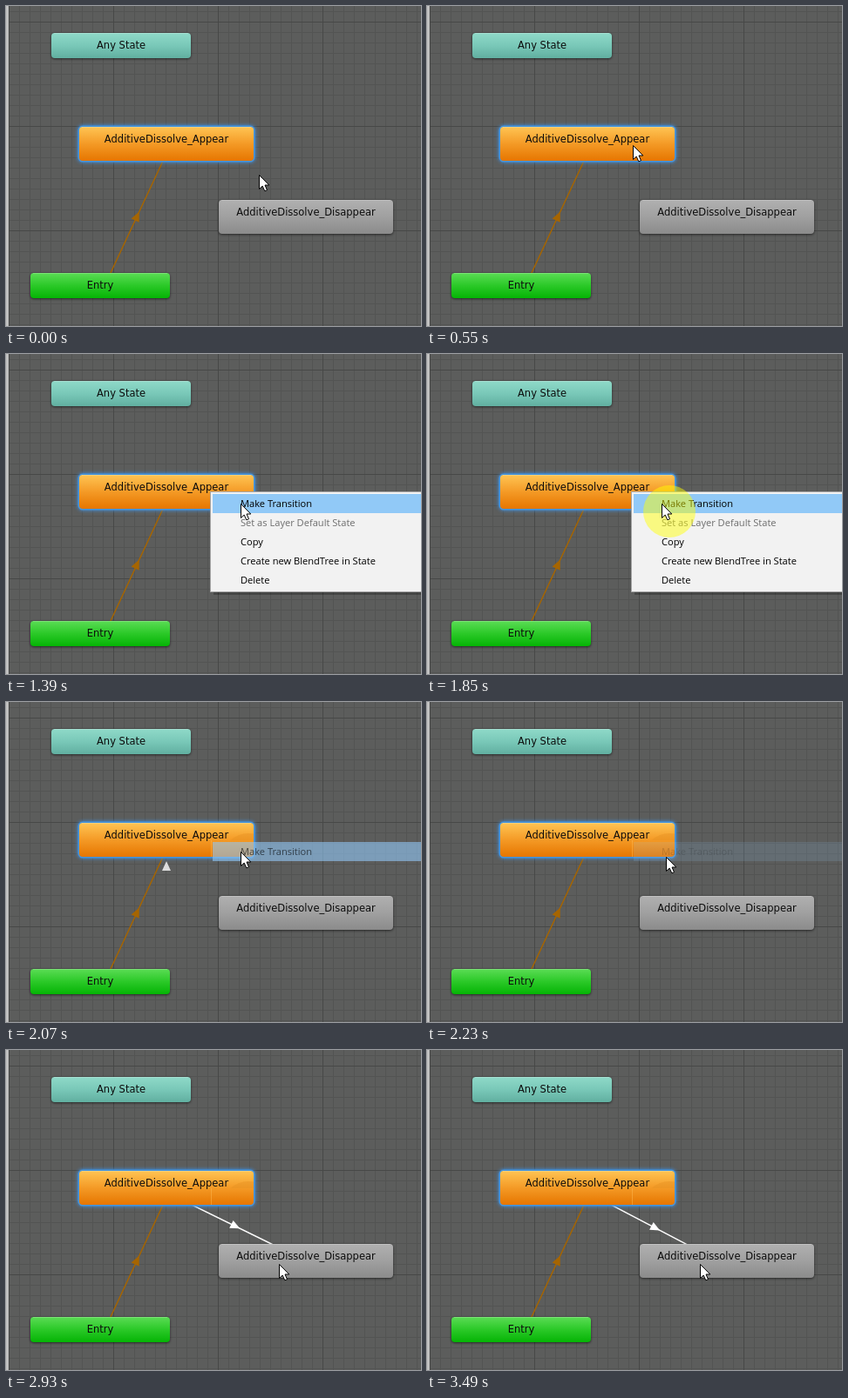
An HTML page with a canvas that plays this animation: 476x368 px, repeating every 4650 ms.

```html
<!DOCTYPE html>
<html lang="en">
<head>
<meta charset="utf-8">
<title>State graph</title>
<style>
html, body { margin: 0; width: 100%; height: 100%; overflow: hidden; background: #5c5d5c; }
canvas { display: block; }
</style>
</head>
<body>
<canvas id="stage" width="476" height="368"></canvas>
<script>
const W = 476, H = 368, LOOP = 4650;
const ctx = document.getElementById('stage').getContext('2d');
const NODE_FONT = '11.5px "DejaVu Sans", sans-serif';
const MENU_FONT = '11.1px "Open Sans", sans-serif';

const nodes = {
  any: { x: 52, y: 31, w: 160, h: 29, label: 'Any State', colors: ['#8fd9c8', '#79c8b8', '#61afa0'] },
  appear: { x: 84, y: 139, w: 200, h: 39, label: 'AdditiveDissolve_Appear', colors: ['#ffc453', '#f49a26', '#e67600'], selected: true },
  disappear: { x: 244, y: 223, w: 200, h: 39, label: 'AdditiveDissolve_Disappear', colors: ['#b0b0b0', '#a0a0a0', '#8b8b8b'] },
  entry: { x: 28, y: 307, w: 160, h: 29, label: 'Entry', colors: ['#5bdc55', '#2bc928', '#05b405'] }
};
const center = n => ({ x: n.x + n.w / 2, y: n.y + n.h / 2 });

const menuItems = ['Make Transition', 'Set as Layer Default State', 'Copy', 'Create new BlendTree in State', 'Delete'];

// Pointer positions: [time, x, y], each held until the next.
const pointerPath = [
  [0, 290, 194], [80, 268, 168], [150, 245, 158], [230, 238, 168],
  [480, 237, 164], [550, 236, 160], [1310, 252, 166], [1390, 269, 172],
  [2150, 270, 173], [2230, 274, 178], [2300, 281, 186], [2380, 289, 194],
  [2460, 295, 200], [2530, 298, 204], [2620, 301, 212], [2700, 305, 223],
  [2780, 309, 234], [2850, 312, 242], [2930, 313, 246]
];

function pointerAt(t) {
  const [, x, y] = pointerPath.findLast(p => p[0] <= t);
  return { x, y };
}

function fillRect(color, x, y, w, h) {
  ctx.fillStyle = color;
  ctx.fillRect(x, y, w, h);
}

function polygon(points) {
  ctx.beginPath();
  points.forEach(([x, y]) => ctx.lineTo(x, y));
  ctx.closePath();
}

function drawGrid() {
  fillRect('#5c5d5c', 0, 0, W, H);
  for (const [step, color] of [[12, '#535453'], [120, '#474847']]) {
    for (let x = 3; x < W; x += step) fillRect(color, x, 0, 1, H);
    for (let y = step === 12 ? 6 : 18; y < H; y += step) fillRect(color, 0, y, W, 1);
  }
  fillRect('#c0c0c0', 0, 0, 3, H);
}

function drawNode(n) {
  const gradient = ctx.createLinearGradient(0, n.y, 0, n.y + n.h);
  n.colors.forEach((c, i) => gradient.addColorStop(i / 2, c));
  ctx.save();
  ctx.beginPath();
  ctx.roundRect(n.x, n.y, n.w, n.h, 4);
  if (n.selected) {
    ctx.shadowColor = '#3d8fe0';
    ctx.shadowBlur = 4;
    ctx.strokeStyle = '#4b98dc';
    ctx.lineWidth = 3;
    ctx.stroke();
  } else {
    ctx.shadowColor = 'rgba(0,0,0,.6)';
    ctx.shadowBlur = 3;
    ctx.shadowOffsetY = 1;
  }
  ctx.fillStyle = gradient;
  ctx.fill();
  ctx.restore();
  fillRect('rgba(255,255,255,.2)', n.x + 3, n.y, n.w - 6, 1);
  ctx.fillStyle = '#0c0c0c';
  ctx.font = NODE_FONT;
  ctx.textAlign = 'center';
  ctx.fillText(n.label, n.x + n.w / 2, n.y + 18);
}

function drawArrowhead(x, y, angle, color) {
  ctx.save();
  ctx.translate(x, y);
  ctx.rotate(angle);
  polygon([[6, 0], [-5, -5], [-5, 5]]);
  ctx.fillStyle = color;
  ctx.fill();
  ctx.restore();
}

// Edges run beside the line between centers, shifted to the right of travel.
function drawEdge(a, b, color, shiftEnd = true) {
  const angle = Math.atan2(b.y - a.y, b.x - a.x);
  const dx = -4.7 * Math.sin(angle), dy = 4.7 * Math.cos(angle);
  const x1 = a.x + dx, y1 = a.y + dy;
  const x2 = b.x + (shiftEnd ? dx : 0), y2 = b.y + (shiftEnd ? dy : 0);
  ctx.strokeStyle = color;
  ctx.lineWidth = 1.5;
  ctx.beginPath();
  ctx.moveTo(x1, y1);
  ctx.lineTo(x2, y2);
  ctx.stroke();
  drawArrowhead((x1 + x2) / 2, (y1 + y2) / 2, Math.atan2(y2 - y1, x2 - x1), color);
}

function drawTransition(t, pointer) {
  const from = center(nodes.appear), to = center(nodes.disappear);
  if (t < 2070) return;
  if (t < 2150) drawArrowhead(184, 189, -Math.PI / 2, '#dcdcdc');
  else if (t >= 3410) drawEdge(from, to, '#fff');
  else if (pointer.y >= nodes.disappear.y) drawEdge(from, to, '#fff', false);
  else drawEdge(from, { x: pointer.x - 2, y: pointer.y - 2 }, '#fff', false);
}

// Faint marks left on the selected node once the menu has closed.
function drawMarks() {
  fillRect('rgba(255,190,90,.45)', 235, 159, 1, 19);
  ctx.save();
  ctx.beginPath();
  ctx.rect(255, 151, 29, 8);
  ctx.clip();
  drawDisc(278, 181, 'rgba(228,145,35,.45)');
  ctx.restore();
}

function drawDisc(x, y, color) {
  ctx.beginPath();
  ctx.arc(x, y, 30, 0, 2 * Math.PI);
  ctx.fillStyle = color;
  ctx.fill();
}

function drawMenuItem(i, alpha) {
  ctx.globalAlpha = alpha;
  ctx.font = MENU_FONT;
  ctx.textAlign = 'left';
  ctx.fillStyle = i === 1 ? '#6d6d6d' : '#000';
  ctx.fillText(menuItems[i], 269, 176 + 22 * i);
  ctx.globalAlpha = 1;
}

function drawHighlight(alpha) {
  ctx.globalAlpha = alpha;
  fillRect('#91c9f7', 237, 161, W - 237, 22);
  ctx.globalAlpha = 1;
}

function drawMenu(t) {
  if (t >= 1010 && t < 2070) {
    const opening = t < 1090;
    ctx.globalAlpha = opening ? 0.6 : 1;
    if (!opening) fillRect('rgba(0,0,0,.25)', 238, 274, W - 238, 3);
    fillRect('#a6a6a6', 234, 158, W - 234, 116);
    fillRect('#f2f2f2', 235, 159, W - 235, 114);
    if (t >= 1310) drawHighlight(1);
    menuItems.forEach((_, i) => drawMenuItem(i, opening ? 0.75 : 1));
  } else if (t >= 2070 && t < 2300) {
    const alpha = t < 2150 ? 0.6 : t < 2230 ? 0.35 : 0.15;
    drawHighlight(alpha);
    drawMenuItem(0, alpha);
  }
}

function drawPointer({ x, y }) {
  ctx.save();
  ctx.translate(x + 0.5, y + 0.5);
  polygon([[0, 0], [0, 16], [3.7, 12.6], [6.3, 18.3], [9, 17.2], [6.5, 11.5], [11.3, 11.5]]);
  ctx.fillStyle = '#fff';
  ctx.strokeStyle = '#000';
  ctx.lineWidth = 1;
  ctx.fill();
  ctx.stroke();
  ctx.restore();
}

function draw(t) {
  const pointer = pointerAt(t);
  const pressed = (t >= 1850 && t < 2070) || (t >= 3410 && t < 3490);
  drawGrid();
  drawEdge(center(nodes.entry), center(nodes.appear), '#a66500');
  drawTransition(t, pointer);
  Object.values(nodes).forEach(drawNode);
  if (t >= 2070) drawMarks();
  drawMenu(t);
  if (pressed) drawDisc(pointer.x + 9, pointer.y + 9, 'rgba(255,255,0,.47)');
  drawPointer(pointer);
}

const start = performance.now();
function tick() {
  draw((performance.now() - start) % LOOP);
  requestAnimationFrame(tick);
}
tick();
</script>
</body>
</html>
```
